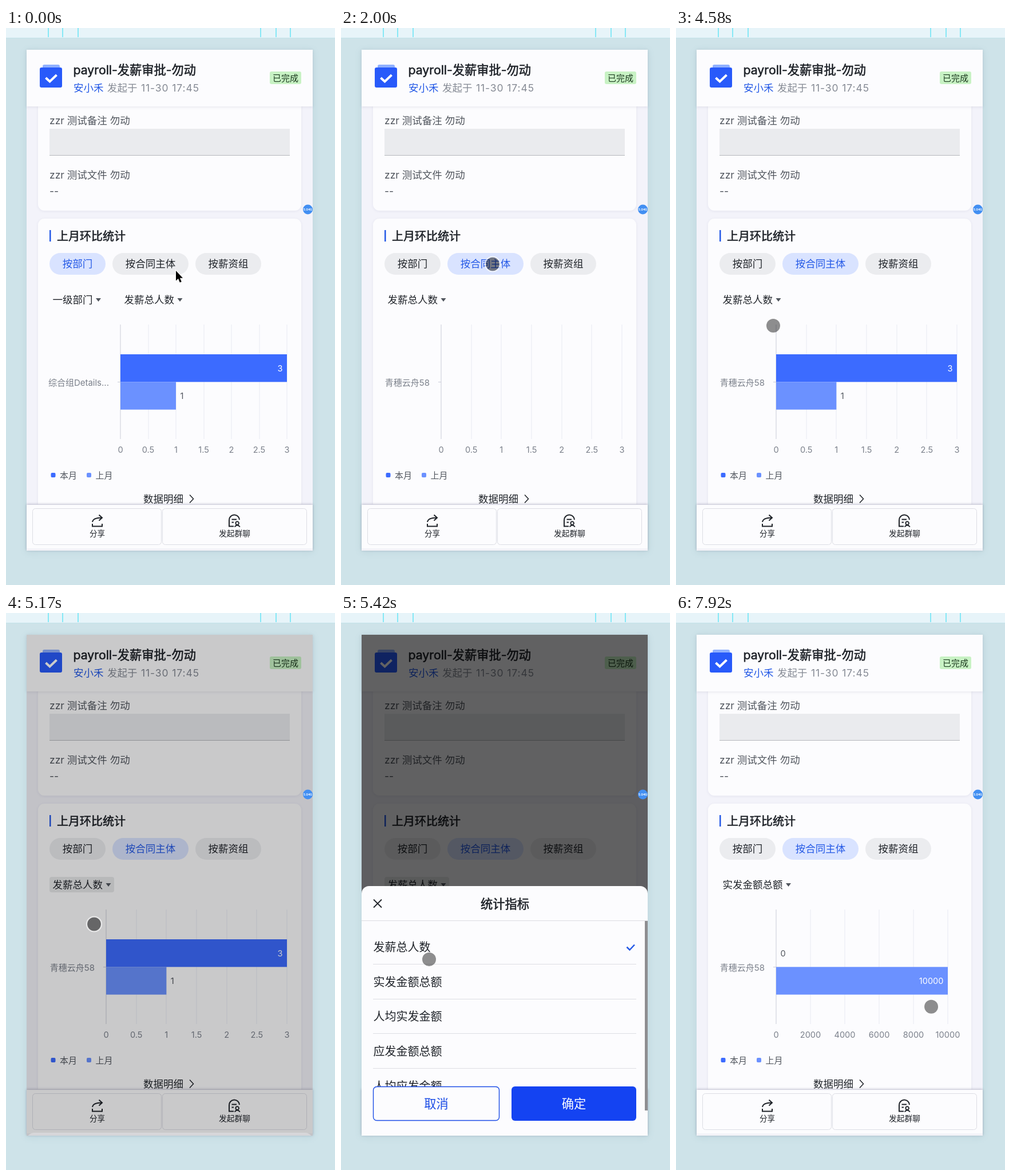
Animation of 575x973 px, one loop 8000 ms. Source, as an HTML page with a canvas:

```html
<!DOCTYPE html>
<html lang="zh-CN">
<head>
<meta charset="utf-8">
<title>审批统计</title>
<style>
  html, body { margin: 0; width: 100%; height: 100%; overflow: hidden; background: #cee3e9; }
  canvas { display: block; width: 575px; height: 973px; }
</style>
</head>
<body>
<canvas id="stage"></canvas>
<script>
const W = 575, H = 973, LOOP = 8000, FPS = 12;
const canvas = document.getElementById('stage');
const ratio = window.devicePixelRatio || 1;
canvas.width = W * ratio;
canvas.height = H * ratio;
const g = canvas.getContext('2d');

const INK = '#1f2329', GREY = '#50555d', PALE = '#7b808b', BLUE = '#2459e6';
const PAPER = '#fcfcfe', BAR = '#3c6bff', BAR_LIGHT = '#6b91ff';
const METRICS = ['发薪总人数', '实发金额总额', '人均实发金额', '应发金额总额', '人均应发金额'];
const DIGITS = 14.6;

const clamp = v => Math.max(0, Math.min(1, v));
const span = (t, from, length) => clamp((t - from) / length);
const mix = (a, b, p) => a + (b - a) * p;
const cubicOut = p => 1 - (1 - p) ** 3;
const cubicInOut = p => p < .5 ? 4 * p ** 3 : 1 - (2 - 2 * p) ** 3 / 2;

function rect(x, y, w, h, fill) {
  g.fillStyle = fill;
  g.fillRect(x, y, w, h);
}

function round(x, y, w, h, r, fill, stroke, width = 1) {
  g.beginPath();
  g.roundRect(x, y, w, h, r);
  if (fill) { g.fillStyle = fill; g.fill(); }
  if (stroke) { g.strokeStyle = stroke; g.lineWidth = width; g.stroke(); }
}

function disc(x, y, r, fill) {
  g.beginPath();
  g.arc(x, y, r, 0, Math.PI * 2);
  g.fillStyle = fill;
  g.fill();
}

function line(path, color, width = 1) {
  g.strokeStyle = color;
  g.lineWidth = width;
  g.stroke(new Path2D(path));
}

// The y value is the optical middle of the glyphs.
function text(str, x, y, size, color = INK, align = 'left', weight = 400) {
  g.font = `${weight} ${size}px Inter, "Noto Sans CJK SC", "Noto Sans CJK", sans-serif`;
  g.textAlign = align;
  g.fillStyle = color;
  g.fillText(str, x, y + size * .37);
  return g.measureText(str).width;
}

// A thin outline gives a weight between regular and bold.
function heading(str, x, y, size, align = 'left') {
  text(str, x, y, size, INK, align);
  g.strokeStyle = INK;
  g.lineWidth = .6;
  g.lineJoin = 'round';
  g.strokeText(str, x, y + size * .37);
  g.lineJoin = 'miter';
}

function clipped(x, y, w, h, draw) {
  g.save();
  g.beginPath();
  g.rect(x, y, w, h);
  g.clip();
  draw();
  g.restore();
}

function shadowed(color, blur, dy, draw) {
  g.save();
  g.shadowColor = color;
  g.shadowBlur = blur * ratio;
  g.shadowOffsetY = dy * ratio;
  draw();
  g.restore();
}

function backdrop() {
  rect(0, 0, W, H, '#cee3e9');
  rect(0, 0, W, 17, '#e7f4f9');
  rect(0, 17, W, 1, '#c3e2ea');
  for (const x of [73, 98, 125, 444, 471, 496]) rect(x, 0, 2, 16, '#86e8f6');
  shadowed('rgba(90,130,145,.14)', 12, 2, () => rect(36, 38, 500, 875, '#f3f3fa'));
}

function header() {
  shadowed('rgba(60,60,100,.12)', 5, 1, () => rect(36, 38, 500, 99, PAPER));
  round(64, 64, 30, 12, 3, '#8fb0ff');
  round(59, 69, 39, 35, 3, '#285afa');
  line('M69.5 87 L76.5 93.5 L88.5 82', '#fff', 4);
  heading('payroll-发薪审批-勿动', 117.5, 73.5, 21.25);
  text('安小禾', 118, 104.5, 17.5, BLUE);
  text('发起于', 177, 104.5, 17.5, '#858a94');
  g.letterSpacing = '.9px';
  text('11-30 17:45', 236, 104.5, 17.5, '#858a94');
  g.letterSpacing = '0px';
  round(461, 76, 55, 22, 3, '#c8f2c4');
  text('已完成', 488.5, 87.5, 15, '#1d3b20', 'center');
}

function formCard() {
  shadowed('rgba(60,60,110,.08)', 5, 1, () => round(56, 100, 460, 219, 11, PAPER));
  text('zzr 测试备注 勿动', 76, 162, 17.5, GREY);
  rect(76, 176, 420, 47, '#eaebee');
  rect(76, 222, 420, 1, '#b5b8bc');
  text('zzr 测试文件 勿动', 76, 257, 17.5, GREY);
  text('--', 76, 285, 17.5, GREY);
}

function tab(label, x, w, active) {
  round(x, 393, w, 38, 19, active ? '#d9e3ff' : '#ebecef');
  text(label, x + w / 2, 412, 17.5, active ? BLUE : INK, 'center');
}

function dropdown(label, x, held) {
  if (held) round(x - 5.5, 461, 113, 27, 4, 'rgba(31,35,41,.09)');
  const end = x + text(label, x, 475, 17.5) + 10;
  g.fillStyle = GREY;
  g.fill(new Path2D(`M${end - 4.5} 472 h9 l-4.5 6 z`));
}

function chart({ name, x0, x1, ticks, bars }) {
  const step = (x1 - x0) / (ticks.length - 1);
  ticks.forEach((tick, i) => {
    const x = x0 + i * step;
    rect(Math.round(x) - .5, 518, 1, 200, i ? '#e8e9f1' : '#c9cbd8');
    text(tick, x, 737, DIGITS, PALE, 'center');
  });
  rect(x0 - 5, 618, 5, 1, '#c9cbd8');
  text(name, x0 - 20, 619, 15, PALE, 'right');
  bars.forEach(({ size, label, inside, alpha }, i) => {
    const y = 570 + i * 48.3, width = (x1 - x0) * size;
    rect(x0, y, width, 48.3, i ? BAR_LIGHT : BAR);
    g.save();
    g.globalAlpha *= alpha;
    const x = x0 + width + (inside ? -7.5 : 7.5);
    text(label, x, y + 24.5, DIGITS, inside ? '#fff' : GREY, inside ? 'right' : 'left');
    g.restore();
  });
}

function headcount(name, x0, p) {
  chart({
    name, x0, x1: 491, ticks: ['0', '0.5', '1', '1.5', '2', '2.5', '3'],
    bars: [
      { size: p, label: '3', inside: true, alpha: p },
      { size: p / 3, label: '1', inside: false, alpha: p }
    ]
  });
}

function amounts(p) {
  chart({
    name: '青穗云舟58', x0: 175, x1: 475, ticks: ['0', '2000', '4000', '6000', '8000', '10000'],
    bars: [
      { size: 1 - p, label: '0', inside: false, alpha: p },
      { size: mix(.35, 1, p), label: '10000', inside: true, alpha: p }
    ]
  });
}

function statsCard(t) {
  const switched = t > 1160, loaded = t > 1990, confirmed = t > 7075;
  shadowed('rgba(60,60,110,.08)', 5, 1, () => round(56, 333, 460, 560, 11, PAPER));
  rect(76, 353, 2.5, 20, BLUE);
  heading('上月环比统计', 89, 364, 20);
  tab('按部门', 76, 98, !switched);
  tab('按合同主体', 186, 133, switched);
  tab('按薪资组', 331, 115, false);

  if (switched) {
    dropdown(METRICS[confirmed ? 1 : 0], 81.5, t > 5075 && t < 6075);
  } else {
    dropdown('一级部门', 81.5);
    dropdown('发薪总人数', 206.5);
  }

  if (confirmed) amounts(cubicInOut(span(t, 7080, 500)));
  else if (loaded) headcount('青穗云舟58', 175, cubicOut(span(t, 2000, 1000)));
  else {
    g.save();
    g.globalAlpha = 1 - .5 * span(t, 1100, 200);
    headcount('综合组Details...', 200, 1);
    g.restore();
  }

  ['本月', '上月'].forEach((label, i) => {
    round(78.5 + i * 62.5, 777, 8, 8, 2, i ? BAR_LIGHT : BAR);
    text(label, 94 + i * 62.5, 781, 15, GREY);
  });
  text('数据明细', 240, 822.5, 17.5);
  line('M321 815.5 L327.5 822.5 L321 829.5', INK, 1.5);
}

function footer() {
  shadowed('rgba(50,50,90,.3)', 4, -1, () => rect(36, 833, 500, 80, PAPER));
  rect(36, 909, 500, 4, '#f3f3f8');
  round(46.5, 839.5, 225, 63, 5, PAPER, '#dcdde4');
  round(273.5, 839.5, 252, 63, 5, PAPER, '#dcdde4');
  line('M151 863 C152 857 158 855.5 167 855.5 M162.5 850.5 L168 855.5 L162.5 860.5', INK, 2);
  line('M151 866 V870.5 H168 V866', INK, 2);
  text('分享', 159.5, 883, 13.5, INK, 'center');
  line('M398 870.5 H390 V860 A9 9 0 0 1 408 859 M394.5 858.5 H403 M394.5 863.5 H398', INK, 2);
  line('M407 865 a2.8 2.8 0 1 1 -5.6 0 a2.8 2.8 0 1 1 5.6 0 M399.5 871.5 q4.7 -6 9.4 0', INK, 1.8);
  text('发起群聊', 399.5, 883, 13.75, INK, 'center');
}

function page(t) {
  clipped(36, 137, 500, 695, () => { formCard(); statsCard(t); });
  header();
  footer();
}

function sheetState(t) {
  const open = span(t, 5080, 260), close = span(t, 7022, 270) ** 3;
  return { shown: open ** 4 * (1 - close), fade: open * (1 - close) };
}

function sheet(t) {
  const { shown, fade } = sheetState(t);
  if (fade <= 0) return;
  clipped(36, 38, 500, 875, () => {
    rect(36, 38, 500, 875, `rgba(0,0,0,${.61 * fade})`);
    g.globalAlpha = fade;
    g.translate(0, Math.round(mix(913, 477, shown)));
    round(36, 0, 500, 460, [13, 13, 0, 0], PAPER);
    line('M57 23.5 L71 37.5 M71 23.5 L57 37.5', INK, 1.8);
    heading('统计指标', 286.5, 31, 21.25, 'center');
    rect(36, 60, 500, 1, '#dcdde2');
    const chosen = t > 6160 ? 1 : 0;
    clipped(36, 61, 500, 289, () => METRICS.forEach((label, i) => {
      const y = 106.5 + i * 60.7;
      text(label, 56.5, y, 20);
      rect(56, Math.round(y + 29.5), 460, 1, '#dddee3');
      if (i === chosen) line(`M499.5 ${y} l5 5 l8.5 -9`, BLUE, 2.5);
    }));
    rect(531, 61, 5, 331, t > 6000 ? '#b0b0b2' : '#8e8e91');
    round(56.5, 350.5, 220, 59, 6, PAPER, '#1c4de6', 1.4);
    text('取消', 166.5, 380.5, 21.25, '#1c4de6', 'center');
    round(298, 350, 218, 60, 6, '#1443f2');
    text('确定', 407, 380.5, 21.25, '#fff', 'center');
  });
}

function badge() {
  disc(527.5, 317, 8.5, '#428ff2');
  text('5.04G', 527.5, 317, 5, '#fff', 'center', 700);
}

// Pointer path: time, x, y.
const PATH = [
  [80, 297, 425], [330, 281, 423], [667, 281, 423], [750, 268, 414], [833, 265, 412.5],
  [2400, 265, 412.5], [2750, 291, 426], [3200, 466, 540], [3583, 460, 603], [4000, 300, 424],
  [4417, 178, 481], [4583, 170, 520], [4750, 155, 567], [4917, 154, 543.5], [5250, 154, 543.5],
  [5417, 154, 605], [5833, 155, 654], [5917, 163, 672], [6167, 163, 672], [6500, 460, 812],
  [6583, 460, 812], [6667, 427, 856], [6750, 427, 856], [6833, 430, 855], [7250, 430, 855],
  [7833, 463, 631], [7917, 446, 688], [8000, 446, 688]
];
const PRESSES = [[825, 2080], [5075, 5340], [6075, 6240], [6825, 7160]];

function pointer(t) {
  if (t < 80) {
    const arrow = new Path2D('M297 424 V441.5 L301 437.8 L303.8 444.5 L306.8 443.2 L304 436.8 H309 Z');
    g.lineWidth = 2;
    g.strokeStyle = '#fff';
    g.stroke(arrow);
    g.fillStyle = '#000';
    g.fill(arrow);
    return;
  }
  const next = Math.max(1, PATH.findIndex(point => point[0] > t));
  const [ta, xa, ya] = PATH[next - 1], [tb, xb, yb] = PATH[next];
  const p = clamp((t - ta) / (tb - ta));
  const x = mix(xa, xb, p), y = mix(ya, yb, p);
  if (PRESSES.some(([from, to]) => t >= from && t < to)) {
    disc(x, y, 12, 'rgba(0,0,0,.49)');
    g.beginPath();
    g.arc(x, y, 13, 0, Math.PI * 2);
    g.strokeStyle = 'rgba(255,255,255,.6)';
    g.lineWidth = 2.2;
    g.stroke();
  } else {
    disc(x, y, 12, 'rgba(0,0,0,.44)');
  }
}

const start = performance.now();
function frame() {
  const elapsed = (performance.now() - start) % LOOP;
  const t = Math.floor((elapsed + 6) * FPS / 1000) * 1000 / FPS % LOOP;
  g.setTransform(ratio, 0, 0, ratio, 0, 0);
  backdrop();
  page(t);
  sheet(t);
  badge();
  pointer(t);
  requestAnimationFrame(frame);
}
frame();
</script>
</body>
</html>
```
